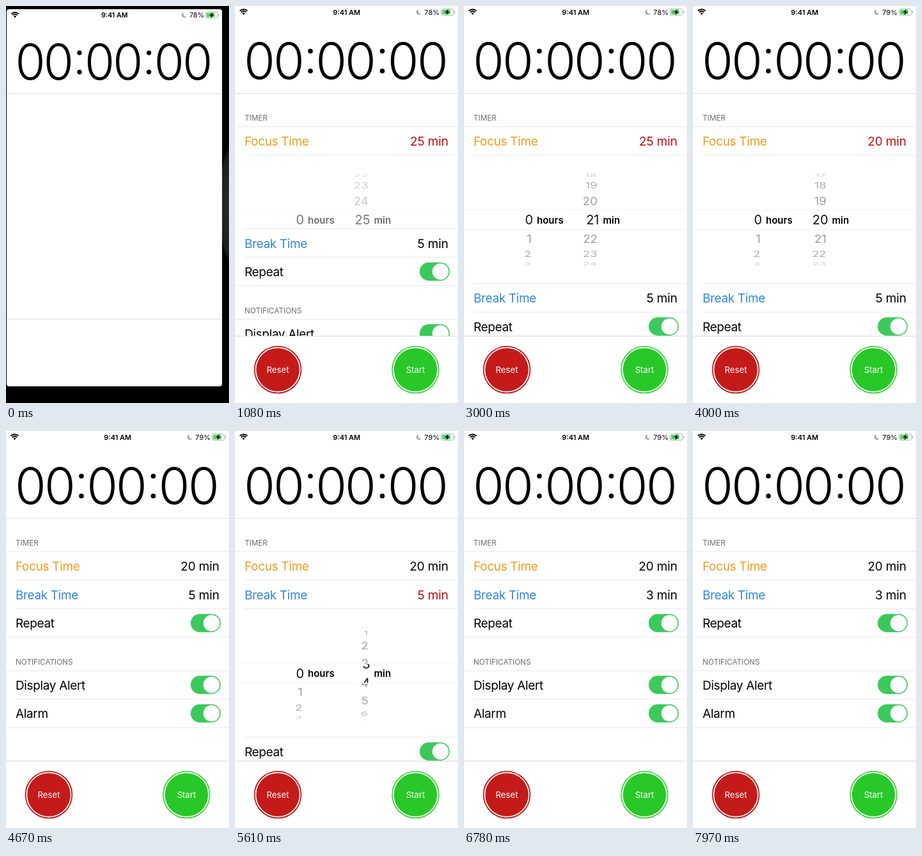
Recreate the animation shown at these times as an HTML page with a canvas. Size 349x620 px, loop 8000 ms.

```html
<!DOCTYPE html>
<html lang="en">
<head>
<meta charset="utf-8">
<title>Focus timer</title>
<style>
  html, body { margin: 0; width: 100%; height: 100%; overflow: hidden; background: #000; }
  canvas { display: block; width: 349px; height: 620px; }
</style>
</head>
<body>
<canvas id="stage"></canvas>
<script>
const W = 349, H = 620, LOOP = 8000;
const ROW = 44.5, PICKER = 200.5, LIST_TOP = 137, LIST_BOTTOM = 515;
const RED = '#c41a1a', GREEN = '#28c828', LINE = '#e9e9eb';
const canvas = document.getElementById('stage');
const ctx = canvas.getContext('2d');
const ratio = window.devicePixelRatio || 1;
canvas.width = W * ratio;
canvas.height = H * ratio;

const mix = (a, b, p) => a + (b - a) * p;
const clamp = v => Math.min(1, Math.max(0, v));
const ease = (t, from, to) => {
  const p = clamp((t - from) / (to - from));
  return p * p * (3 - 2 * p);
};

function scoped(draw) {
  ctx.save();
  draw();
  ctx.restore();
}

function clipBox(x, y, w, h) {
  ctx.beginPath();
  ctx.rect(x, y, w, h);
  ctx.clip();
}

// y is the middle of the capital letters
function text(str, x, y, size, { color = '#000', weight = 400, align = 'left', spacing = 0 } = {}) {
  ctx.font = `${weight} ${size}px Inter, Roboto, sans-serif`;
  ctx.letterSpacing = spacing + 'px';
  ctx.textAlign = align;
  ctx.fillStyle = color;
  ctx.fillText(str, x, y + size * 0.364);
}

function disc(x, y, r, color) {
  ctx.fillStyle = color;
  ctx.beginPath();
  ctx.arc(x, y, r, 0, Math.PI * 2);
  ctx.fill();
}

function pill(x, y, w, h, r, color) {
  ctx.fillStyle = color;
  ctx.beginPath();
  ctx.roundRect(x, y, w, h, r);
  ctx.fill();
}

function rule(y, x = 0, color = LINE) {
  ctx.fillStyle = color;
  ctx.fillRect(x, y - 0.5, W - x, 1);
}

function polygon(points, color) {
  ctx.fillStyle = color;
  ctx.beginPath();
  points.forEach(([x, y]) => ctx.lineTo(x, y));
  ctx.fill();
}

function statusBar(percent) {
  ctx.strokeStyle = '#000';
  ctx.lineWidth = 1.9;
  for (const r of [8.4, 5.4]) {
    ctx.beginPath();
    ctx.arc(13.5, 13.6, r, -Math.PI * 0.75, -Math.PI * 0.25);
    ctx.stroke();
  }
  ctx.fillStyle = '#000';
  ctx.beginPath();
  ctx.moveTo(13.5, 14);
  ctx.arc(13.5, 13.6, 3, -Math.PI * 0.75, -Math.PI * 0.25);
  ctx.fill();

  text('9:41 AM', 174.7, 9.5, 11, { weight: 600, align: 'center' });
  disc(288, 9.5, 4.3, '#a3a3a6');
  disc(290.4, 8, 4, '#fff');
  text(percent + '%', 320, 9.5, 11, { align: 'right' });

  ctx.strokeStyle = '#a8a8a8';
  ctx.lineWidth = 0.9;
  ctx.beginPath();
  ctx.roundRect(322.5, 4.6, 19.5, 9.8, 2.6);
  ctx.stroke();
  pill(343, 7.8, 1.3, 3.4, 0.6, '#a8a8a8');
  pill(324, 6, 13, 7, 1.3, '#4cd964');
  polygon([[334, 4.6], [328.4, 10.2], [331.6, 10.2], [330.4, 14.6], [336, 8.7], [332.7, 8.7]], '#000');
}

function clock() {
  for (const x of [38.3, 84.3, 150.6, 196.4, 263.2, 309.3])
    text('0', x, 85.5, 79, { weight: 300, align: 'center' });
  for (const x of [118, 230.5])
    for (const y of [70.5, 101.5]) disc(x, y, 3.8, '#000');
}

function toggle(y) {
  pill(289, y - 14.2, 47, 28.4, 14.2, '#3bc95c');
  disc(321.6, y, 12.8, '#fff');
}

function roundButton(x, label, color, ring) {
  ctx.strokeStyle = ring;
  ctx.lineWidth = 1.8;
  ctx.beginPath();
  ctx.arc(x, 568, 36.4, 0, Math.PI * 2);
  ctx.stroke();
  disc(x, 568, 33.8, color);
  text(label, x, 568.3, 13.2, { color: '#fff', align: 'center' });
}

// Numbers sit on a cylinder seen from the front.
function wheel(value, right, cy, size, color, wraps) {
  const step = 0.415, radius = 73;
  for (let n = Math.ceil(value - 3.6); n <= value + 3.6; n++) {
    if (!wraps && n < 0) continue;
    const angle = (n - value) * step;
    const depth = Math.cos(angle);
    scoped(() => {
      ctx.translate(right - (1 - depth) * 1.5, cy + radius * Math.sin(angle));
      ctx.scale(mix(0.93, 1, depth), depth);
      ctx.globalAlpha *= clamp(0.25 + depth * 0.85);
      text((n + 60) % 60, 0, 0, size, { color, align: 'right' });
    });
  }
}

function picker(top, open, minutes) {
  if (open <= 0) return;
  const cy = top + 101, band = 15;
  scoped(() => {
    clipBox(0, top, W, PICKER * open);
    ctx.globalAlpha *= open;
    scoped(() => {
      ctx.beginPath();
      ctx.rect(0, top, W, cy - band - top);
      ctx.rect(0, cy + band, W, PICKER);
      ctx.clip();
      wheel(0, 106, cy, 18.7, '#9c9c9c', false);
      wheel(minutes, 209, cy, 18.7, '#9c9c9c', true);
    });
    scoped(() => {
      clipBox(0, cy - band, W, band * 2);
      wheel(0, 108, cy, 20, '#111', false);
      wheel(minutes, 211.5, cy, 20, '#111', true);
    });
    rule(cy - band - 0.5, 0, '#f3f3f3');
    rule(cy + band + 0.5, 0, '#f3f3f3');
    text('hours', 114, cy + 0.5, 15, { weight: 600 });
    text('min', 217.5, cy + 0.5, 15, { weight: 600 });
  });
}

function settings(t) {
  const body = { spacing: -0.35 };
  const label = (str, y, color) => text(str, 15, y, 19, { ...body, color });
  const amount = (n, y, open) =>
    text(n + ' min', 334, y, 19, { spacing: -0.1, align: 'right', color: open > 0 ? '#c3080e' : '#000' });
  const header = (str, y) => text(str, 15, y, 11.7, { color: '#6d6d72' });

  const focusOpen = ease(t, 900, 1230) - ease(t, 4160, 4490);
  const breakOpen = ease(t, 4930, 5240) - ease(t, 6260, 6580);
  const focusWheel = 25 - 4 * ease(t, 1900, 2950) - ease(t, 3080, 3480);
  const breakWheel = 5 - 3 * ease(t, 5260, 5610) / 2 - 0.5 * ease(t, 5610, 5860);

  let y = 188.5;
  header('TIMER', 174.5);
  rule(y);
  label('Focus Time', y + 22.5, '#f39a1d');
  amount(t < 3700 ? 25 : 20, y + 22.5, focusOpen);
  y += ROW;
  rule(y, 15);
  picker(y, focusOpen, focusWheel);
  y += PICKER * focusOpen;
  if (focusOpen > 0) rule(y, 15);

  label('Break Time', y + 23, '#2f86e0');
  amount(t < 6100 ? 5 : 3, y + 23, breakOpen);
  y += ROW;
  rule(y, 15);
  picker(y, breakOpen, breakWheel);
  y += PICKER * breakOpen;
  if (breakOpen > 0) rule(y, 15);

  label('Repeat', y + 22.7);
  toggle(y + 22.5);
  y += ROW;
  rule(y);

  header('NOTIFICATIONS', y + 38.5);
  y += 52.5;
  rule(y);
  for (const [i, name] of ['Display Alert', 'Alarm'].entries()) {
    label(name, y + 22.5);
    toggle(y + 22);
    y += ROW;
    rule(y, i ? 0 : 15);
  }
}

function edgeGlow() {
  scoped(() => {
    ctx.translate(W + 2, 310);
    ctx.scale(0.2, 1);
    const glow = ctx.createRadialGradient(0, 0, 20, 0, 0, 90);
    glow.addColorStop(0, '#2b2b2b');
    glow.addColorStop(0.85, '#1c1c1c');
    glow.addColorStop(1, '#000');
    disc(0, 0, 90, glow);
  });
}

function draw(t) {
  const grown = ease(t, 30, 330);
  const shown = ease(t, 300, 480);
  const height = mix(609.7, H, grown);

  ctx.setTransform(ratio, 0, 0, ratio, 0, 0);
  ctx.fillStyle = '#000';
  ctx.fillRect(0, 0, W, H);
  if (grown < 1) edgeGlow();

  ctx.translate(mix(1, 0, grown), mix(5, 0, grown));
  const scale = mix(0.966, 1, grown);
  ctx.scale(scale, scale);
  pill(0, 0, W, height, mix(4, 0, grown), '#fff');
  statusBar(t < 4000 ? 78 : 79);
  clock();

  if (shown > 0) scoped(() => {
    ctx.globalAlpha = shown;
    scoped(() => {
      clipBox(0, LIST_TOP, W, LIST_BOTTOM - LIST_TOP);
      settings(t);
    });
    roundButton(67, 'Reset', RED, RED);
    roundButton(282.5, 'Start', GREEN, '#43d643');
  });
  rule(136.5, 0, '#dcdcde');
  rule(mix(501, 515.5, grown), 0, '#d9d9db');
}

function tick() {
  draw(performance.now() % LOOP);
  requestAnimationFrame(tick);
}
tick();
</script>
</body>
</html>
```
